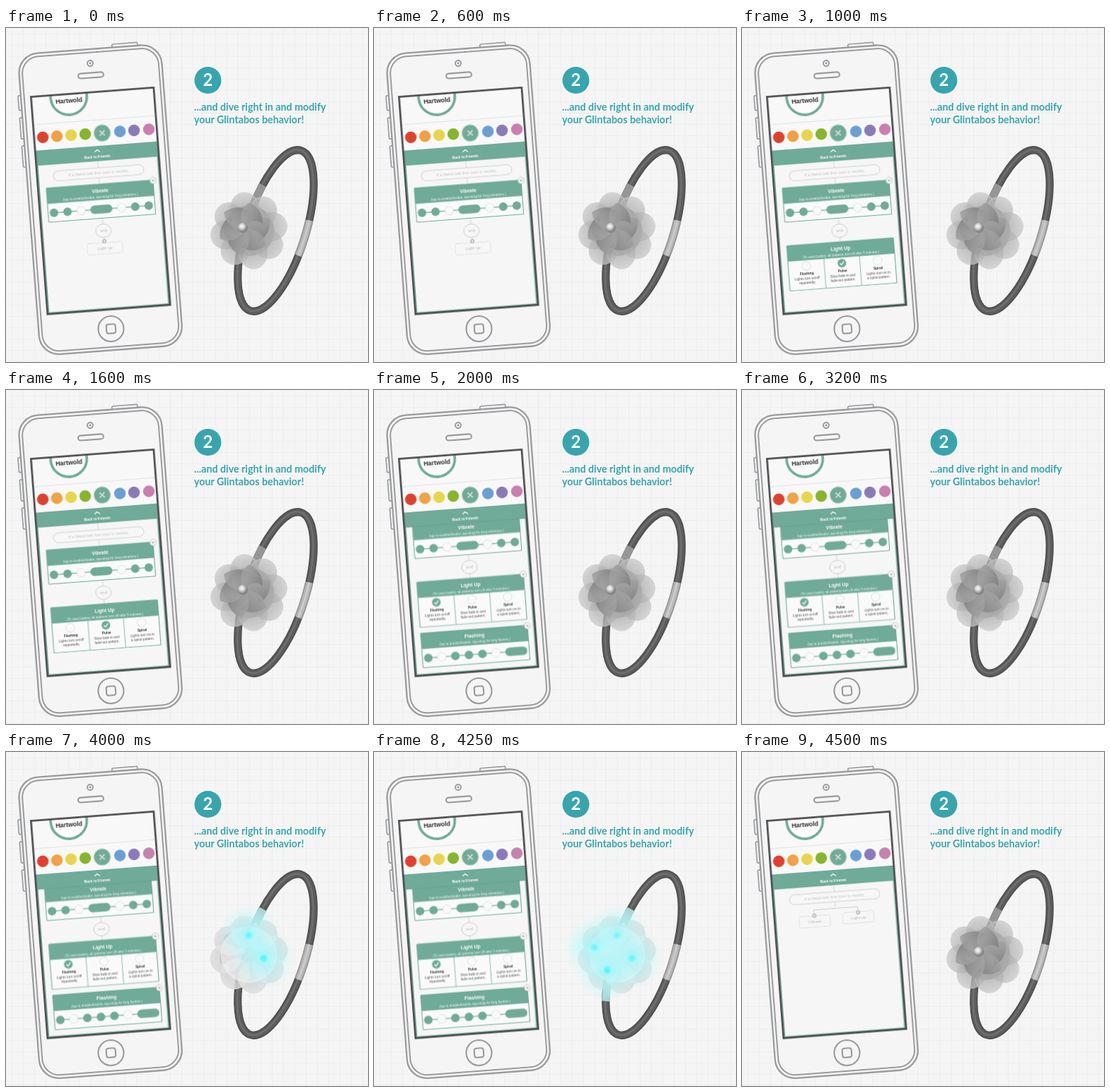
An HTML page for the animation above (5500 ms loop, 512 by 473 pixels).

```html
<!DOCTYPE html>
<html lang="en">
<head>
<meta charset="utf-8">
<title>Modify the behavior</title>
<style>
html, body { margin: 0; width: 100%; height: 100%; overflow: hidden; background: #f5f5f5; }
svg { display: block; width: 512px; height: 473px; }
text { font-family: "Liberation Sans", Arial, sans-serif; }
.head { font-family: Lato, "Open Sans", sans-serif; font-weight: 700; }
</style>
</head>
<body>
<svg id="stage" viewBox="0 0 512 473"></svg>
<script>
const LOOP = 5500, GREEN = '#6fab98', TEAL = '#38a5ad', SCROLL = 36.4;

// ---- drawing helpers, each returns markup ----
const tag = (name, a, body = '') =>
  `<${name} ${Object.entries(a).map(([k, v]) => `${k}="${v}"`).join(' ')}>${body}</${name}>`;
const g = (id, ...parts) => tag('g', { id }, parts.join(''));
const circle = (cx, cy, r, fill, more = {}) => tag('circle', { cx, cy, r, fill, ...more });
const box = (x, y, width, height, rx, fill, stroke = 'none', sw = 1, more = {}) =>
  tag('rect', { x, y, width, height, rx, fill, stroke, 'stroke-width': sw, ...more });
const path = (d, stroke, sw = 1, more = {}) =>
  tag('path', { d, fill: 'none', stroke, 'stroke-width': sw, ...more });
const label = (s, x, y, size, fill, bold) =>
  tag('text', { x, y: y + size * 0.35, 'font-size': size, fill, 'text-anchor': 'middle',
    'font-weight': bold ? 700 : 400 }, s);
const ring = (x, y, r) =>
  circle(x, y, r, '#fafafa', { stroke: '#a9c9be', 'stroke-width': 0.7, 'stroke-dasharray': '1.5 1' });
const close = (x, y) =>
  circle(x, y, 4.5, '#f8f8f8', { stroke: '#b5b5b5', 'stroke-width': 0.7 }) +
  path(`M${x - 1.6} ${y - 1.6}l3.2 3.2m0-3.2l-3.2 3.2`, '#8c8c8c', 0.8);
const plus = (x, y) => circle(x, y, 3, '#b4b4b4') + path(`M${x - 2} ${y}h4m-2-2v4`, '#fff', 0.8);
const wish = (s, x, y, w) =>
  box(x - w / 2, y - 8, w, 16, 2, '#f6f6f6', '#c4c4c4', 0.7, { 'stroke-dasharray': '2 1.3' }) +
  label(s, x, y, 6, '#b9b9b9');

// ---- phone ----
function card(top, h, title, note) {
  return box(12, top, 151.5, h, 1, '#fafafa', GREEN, 1.1) +
    box(12, top, 151.5, 22.5, 1, GREEN) +
    label(title, 87.7, top + 9.1, 6.9, '#fff', true) +
    label(note, 87.7, top + 18, 4.65, '#eef7f4');
}

// pattern: x = on, o = off, L = long (two slots)
function beats(top, pattern) {
  const y = top + 36.2;
  let slot = 0, out = path(`M20 ${y}H155`, GREEN, 1.2);
  for (const c of pattern) {
    const x = 20.3 + 19.2 * slot;
    if (c === 'L') out += box(x - 6, y - 6, 31.2, 12, 6, GREEN);
    else out += c === 'x' ? circle(x, y, 6, GREEN) : ring(x, y, 6);
    slot += c === 'L' ? 2 : 1;
  }
  return out;
}

const check = x => circle(x, 243.4, 6, GREEN) + path(`M${x - 2.8} 243.6l2 2.2 3.8-4.4`, '#fff', 1.4);

function options() {
  const list = [
    ['Flashing', 'Lights turn on/off', 'repeatedly.'],
    ['Pulse', 'Slow fade-in and', 'fade-out pattern.'],
    ['Spiral', 'Lights turn on in', 'a spiral pattern.']
  ];
  return list.map(([name, a, b], i) => {
    const x = 37.6 + 50.5 * i;
    return (i ? path(`M${x - 25} 235V277`, GREEN, 0.8) : '') + ring(x, 243.4, 6) +
      label(name, x, 254, 4.8, '#333', true) +
      label(a, x, 261.3, 4.8, '#555') + label(b, x, 267.8, 4.8, '#555');
  }).join('');
}

function screen() {
  const dots = [['#e0412f', 12.6], ['#f0a244', 32.6], ['#e8d54e', 52.7], ['#88b52c', 72.8],
    ['#6b9fd4', 122], ['#8a7ab6', 142], ['#c97fb0', 163]];
  const flow = g('flow',
    path('M87.5 98V130', '#cfcfcf', 0.8),
    box(23.5, 108, 128, 14, 7, '#f7f7f7', '#c6c6c6', 0.8),
    label('If a friend with this color is nearby,', 87.5, 115, 5.7, '#c2c2c2'),
    g('branch', path('M57 137V131.4H119V137', '#c4c4c4', 0.8),
      wish('Vibrate', 57, 147.7, 44), wish('Light up', 119, 146.5, 44),
      plus(56.8, 139.4), plus(119, 139.4)),
    g('rules',
      path('M88 179V214', '#cfcfcf', 0.8),
      card(131, 48.5, 'Vibrate', '(tap to enable/disable, tap+drag for long vibrations.)'),
      beats(130.5, 'xxoLoxx'),
      tag('ellipse', { cx: 88.2, cy: 197.3, rx: 11, ry: 9.5, fill: '#f6f6f6', stroke: '#c4c4c4', 'stroke-width': 0.8 }),
      label('and', 88.2, 197, 6, '#bdbdbd')),
    g('vibClose', close(163.5, 131.8)),
    g('hint', wish('Light up', 88.4, 222.3, 50), plus(88.2, 212.3)),
    g('light',
      card(213, 64.3, 'Light Up', '(To save battery, all patterns turn off after 5 minutes.)'),
      options(), g('pulse', check(88.1))),
    g('flash', check(37.6), close(163.3, 213.2),
      card(285.5, 49, 'Flashing', '(tap to enable/disable, tap+drag for long flashes.)'),
      beats(285, 'xoxxxoL'), close(163.5, 286.4)));

  return tag('g', { 'clip-path': 'url(#glass)' },
    box(0, 0, 174.5, 309.5, 0, '#f6f6f6') +
    flow +
    box(0, 0, 174.5, 77, 0, '#f8f8f8') +
    circle(53.5, 4.5, 25.6, '#fcfcfc', { stroke: GREEN, 'stroke-width': 3.6 }) +
    label('Nadine', 53.4, -1.6, 8.9, '#2c2c2c', true) +
    label('Hartwold', 53.4, 10.1, 8.9, '#2c2c2c', true) +
    path('M2 40.3H173', '#dedede', 0.8) +
    dots.map(([c, x]) => circle(x, 59, 8.2, c)).join('') +
    circle(96.8, 59.3, 12.2, '#b3cdc4') + circle(96.8, 59.3, 11, GREEN) +
    path('M93.2 55.7l7.2 7.2m0-7.2l-7.2 7.2', '#d4dcd9', 1.7) +
    box(0, 77, 174.5, 21.2, 0, GREEN) + path('M0 98H174.5', '#5f9d89', 0.6) +
    path('M84 85.4l3.9-2.9 3.9 2.9', '#fff', 1.3) +
    label('Back to Friends', 87.4, 91.9, 5, '#fff', true) +
    path('M2.2 98V307.6H172.3V98', GREEN, 1.6)) +
    box(0.3, 0.5, 174, 308.7, 0, 'none', '#4b4c4e', 2.7);
}

function phone() {
  const ink = '#999b9e', bg = '#f5f5f5';
  const key = (x, y, w, h) => box(x, y, w, h, 1.2, bg, ink, 1.7);
  return tag('g', { transform: 'translate(35 97) rotate(-4.35)' },
    key(120, -65, 36, 6) + key(-18, -2.5, 6, 21) + key(-18, 29, 6, 30) + key(-18, 69, 6, 30) +
    box(-14, -60.5, 202.5, 427.5, 28, bg, ink, 2.3) +
    box(-9.4, -55.9, 193.3, 418.3, 24, 'none', ink, 2) +
    circle(87.3, -40.5, 4, bg, { stroke: ink, 'stroke-width': 1.9 }) + circle(87.3, -40.5, 1.6, ink) +
    box(69, -27, 36, 7, 3.5, bg, ink, 2.1) +
    circle(88.2, 336.6, 18, bg, { stroke: ink, 'stroke-width': 2.1 }) +
    box(81.7, 330.1, 13, 13, 3, bg, ink, 2.1) + screen());
}

// ---- bracelet ----
const tilt = { transform: 'translate(381.5 287) rotate(17.5)' };
const upper = 'M-37 -56A42 119 0 0 0 -40.3 -34', lower = 'M-37 56A42 119 0 0 1 -31.5 79';

function band() {
  const loop = (stroke, sw, dx = 0) => tag('ellipse', { cx: dx, cy: 0, rx: 42, ry: 119, fill: 'none', stroke, 'stroke-width': sw });
  const clasp = 'M40.8 -28A42 119 0 0 1 41.1 24';
  return tag('g', tilt,
    loop('#505051', 11.2) + loop('#5d5d5e', 7.5) + loop('#6f6f70', 2.6, -0.8) +
    path(upper, '#969696', 11) +
    path(clasp, '#9b9b9b', 11.5) + path(clasp, '#b6b6b6', 8) + path(clasp, '#cbcbcb', 3));
}

const lobes = (fill, more = {}) => Array.from({ length: 8 }, (_, i) =>
  tag('ellipse', { cx: 33, cy: 0, rx: 22, ry: 20.5, fill, transform: `rotate(${45 * i - 10})`, ...more })
).join('');

function flower() {
  const at = { transform: 'translate(343.5 287)' };
  const leaf = 'M0 0C4 -14 16 -24 32 -20C37 -6 31 8 22 14C20 2 12 -4 0 0Z';
  const swirl = Array.from({ length: 6 }, (_, i) => tag('path', {
    d: leaf, fill: 'url(#leaf)', opacity: 0.8, transform: `rotate(${i * 60 + 10})`
  })).join('');
  return tag('g', at, circle(0, 0, 36, '#a6a6a6') +
      lobes('url(#petal)', { 'fill-opacity': 0.75 })) +
    tag('g', { transform: 'translate(338 284.5)' }, swirl) +
    circle(335, 283, 7.2, 'url(#bead)') +
    g('wash', tag('g', at, circle(0, 0, 40, '#f4f6f6', { 'fill-opacity': 0.6 }) +
      lobes('#f4f6f6', { 'fill-opacity': 0.4, stroke: '#dcdfdf', 'stroke-width': 0.8 })));
}

const tint = d => tag('g', tilt, path(d, '#a4d3d4', 11));
const lamp = (x, y) => circle(x, y, 44, 'url(#glow)') + circle(x, y, 7, 'url(#core)');

// ---- scene ----
const stops = list => list.map(([offset, c, o = 1]) =>
  tag('stop', { offset, 'stop-color': c, 'stop-opacity': o })).join('');
const grad = (id, list, more = {}) => tag('radialGradient', { id, ...more }, stops(list));

document.getElementById('stage').innerHTML =
  tag('defs', {},
    tag('pattern', { id: 'grid', width: 16, height: 16, patternUnits: 'userSpaceOnUse' },
      path('M8.5 0V16M0 8.5H16', '#eeeeee', 1)) +
    tag('clipPath', { id: 'glass' }, box(0, 0, 174.5, 309.5, 0, '#000')) +
    tag('linearGradient', { id: 'leaf', x1: 0.2, y1: 0, x2: 0.7, y2: 1 },
      stops([[0, '#a8a8a8'], [0.55, '#939393'], [1, '#7b7b7b']])) +
    grad('petal', [[0, '#9c9c9c'], [0.6, '#acacac'], [0.9, '#c4c4c4'], [1, '#cdcdcd']],
      { gradientUnits: 'userSpaceOnUse', cx: 0, cy: 0, r: 56 }) +
    grad('bead', [[0, '#fff'], [0.45, '#d6d6d6'], [1, '#858585']], { cx: 0.4, cy: 0.35 }) +
    grad('glow', [[0, '#93f8fb', 0.8], [0.3, '#aaf8fa', 0.68], [0.65, '#bcf8fa', 0.42], [1, '#c8fbfc', 0]]) +
    grad('core', [[0, '#4ff3f8'], [0.55, '#62f5f9', 0.75], [1, '#8cf8fb', 0]])) +
  box(0, 0, 512, 473, 0, '#f5f5f5') + box(0, 0, 512, 473, 0, 'url(#grid)') +
  phone() +
  circle(285.5, 74, 19, TEAL) +
  tag('text', { class: 'head', x: 285.5, y: 82.3, 'font-size': 24, fill: '#fff', 'text-anchor': 'middle' }, '2') +
  tag('text', { class: 'head', x: 266, y: 117.4, 'font-size': 14.25, fill: TEAL }, '...and dive right in and modify') +
  tag('text', { class: 'head', x: 266, y: 135.4, 'font-size': 14.25, fill: TEAL }, 'your Glintabos behavior!') +
  band() + flower() +
  g('lampsA', tint(upper), lamp(343.5, 260), lamp(364.5, 292)) +
  g('lampsB', tint(lower), lamp(312, 277), lamp(330, 309));

// ---- timing: hard steps ----
function play(id, prop, table) {
  const frames = table.map(([t, v]) => ({ [prop]: v, offset: t / LOOP, easing: 'step-end' }));
  frames.push({ [prop]: table[table.length - 1][1], offset: 1 });
  const anim = document.getElementById(id).animate(frames, { duration: LOOP, iterations: Infinity });
  anim.startTime = 0;
}

const spans = {
  rules: [0, 4500], vibClose: [0, 2000], hint: [0, 1000], light: [1000, 4500], pulse: [1000, 2000],
  flash: [2000, 4500], branch: [4500, LOOP], wash: [4000, 4500], lampsA: [4000, 4500], lampsB: [4250, 4500]
};
for (const [id, [from, to]] of Object.entries(spans)) {
  const table = [[from, 1]];
  if (from > 0) table.unshift([0, 0]);
  if (to < LOOP) table.push([to, 0]);
  play(id, 'opacity', table);
}
play('flow', 'transform', [[0, 'translate(0px, 0px)'], [2000, `translate(0px, ${-SCROLL}px)`], [4500, 'translate(0px, 0px)']]);
</script>
</body>
</html>
```
